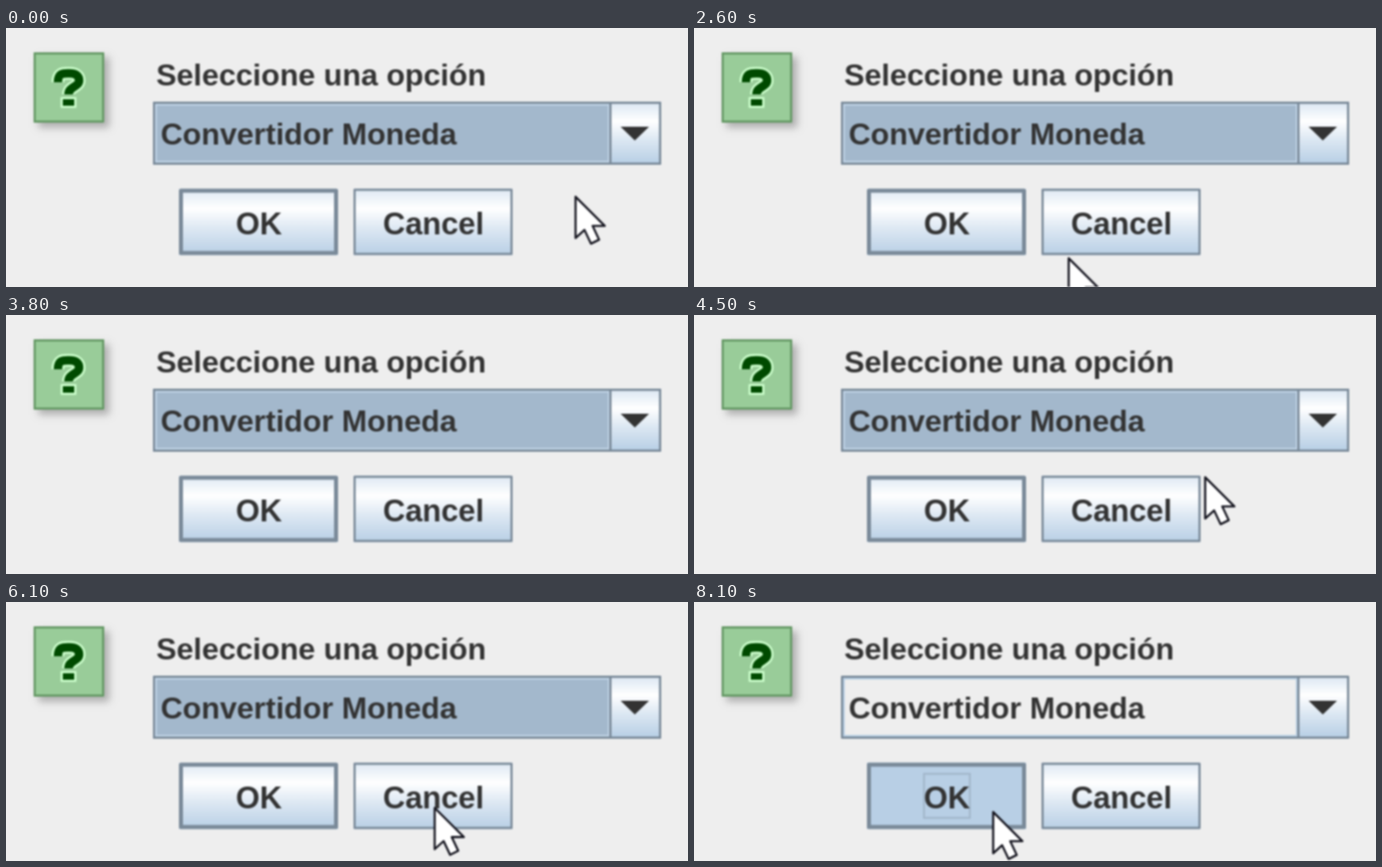
An HTML page with a canvas that plays this animation: 840x320 px, repeating every 8200 ms.

```html
<!DOCTYPE html>
<html lang="es">
<head>
<meta charset="utf-8">
<title>Seleccione una opción</title>
<style>
html, body { margin: 0; width: 840px; height: 320px; overflow: hidden; background: #eee; }
canvas { display: block; filter: blur(.9px); }
</style>
</head>
<body>
<canvas id="stage" width="840" height="320"></canvas>
<script>
const ctx = document.getElementById('stage').getContext('2d');
const LOOP = 8200, STEP = 100;
const EDGE = '#7a8a99', PRESSED = '#b8cfe5', INK = '#333';

// Pointer moves: start time, duration, end x, end y, downward bow
const home = [701, 208];
const moves = [
  [0, 900, 773, 132],
  [1200, 100, 538, 179],
  [1400, 500, 525, 143],
  [1900, 500, 445, 294],
  [2500, 100, 461, 284],
  [2600, 800, 766, 132],
  [3600, 100, 722, 178],
  [3800, 200, 692, 200],
  [4000, 800, 600, 200],
  [4800, 700, 535, 208],
  [5700, 900, 517, 237, 35],
  [6600, 100, 368, 259]
];
const arrow = new Path2D('M0 0V51L11 41L19 58L29 53L21 36H36Z');
const mark = new Path2D('M64 67C64 55 71 56 78 56C86 56 90 59 90 65C90 73 77 72 77 82');
const within = (t, a, b) => t >= a && t < b;

function pointerAt(t) {
  const i = moves.findLastIndex(m => m[0] <= t);
  const [begin, span, x, y, bow = 0] = moves[i];
  const [x0, y0] = i ? moves[i - 1].slice(2) : home;
  const u = Math.min(1, (t - begin) / span), k = u * u * (3 - 2 * u);
  return [x0 + (x - x0) * k, y0 + (y - y0) * k + bow * Math.sin(Math.PI * k)];
}

function rect(x, y, w, h, fill) {
  ctx.fillStyle = fill;
  ctx.fillRect(x, y, w, h);
}

function frame(x, y, w, h, color, line) {
  ctx.strokeStyle = color;
  ctx.lineWidth = line;
  ctx.strokeRect(x + line / 2, y + line / 2, w - line, h - line);
}

function text(str, x, y, size, align = 'left') {
  ctx.font = `bold ${size}px "Liberation Sans", Arial, sans-serif`;
  ctx.textAlign = align;
  ctx.fillStyle = INK;
  ctx.fillText(str, x, y);
}

function bevel(x, y, w, h, pressed) {
  const g = ctx.createLinearGradient(0, y, 0, y + h);
  ['#dde8f3', '#fff', '#dde8f3'].forEach((c, i) => g.addColorStop(i * .3, c));
  g.addColorStop(1, PRESSED);
  rect(x, y, w, h, pressed ? PRESSED : g);
}

function button(label, x, line, pressed) {
  bevel(x, 198.5, 196, 82, pressed);
  frame(x, 198.5, 196, 82, EDGE, line);
  if (pressed) frame(282, 211, 59, 57, '#a3b8cc', 2.5);
  text(label, x + 98.5, 255, 38, 'center');
}

function icon() {
  ctx.save();
  ctx.shadowColor = 'rgba(0,0,0,.27)';
  ctx.shadowBlur = 9;
  ctx.shadowOffsetX = ctx.shadowOffsetY = 6;
  rect(34, 30, 87, 87, '#9c9');
  ctx.restore();
  frame(34, 30, 87, 87, '#696', 2.7);

  ctx.lineJoin = 'round';
  for (const [color, pad] of [['#cfc', 2.7], ['#004a00', 0]]) {
    ctx.strokeStyle = color;
    ctx.lineWidth = 10.5 + pad * 2;
    ctx.stroke(mark);
    rect(70 - pad, 88 - pad, 14 + pad * 2, 8 + pad * 2, color);
  }
}

function combo(focused, pressed) {
  rect(181, 91, 626, 78, focused ? '#a3b8cc' : '#eee');
  frame(183, 93, 561, 74, focused ? '#c3d6e9' : PRESSED, 2.7);
  bevel(745, 93, 60, 74, pressed);
  rect(743, 92, 2.8, 76, EDGE);
  frame(181, 91, 626, 78, EDGE, 2.7);
  ctx.fillStyle = INK;
  ctx.fill(new Path2D('M757 122H792L774.5 139Z'));
  text('Convertidor Moneda', 190.5, 144, 37.5);
}

function pointer(x, y) {
  ctx.save();
  ctx.translate(x + .5, y + .5);
  ctx.fillStyle = '#fff';
  ctx.fill(arrow);
  ctx.strokeStyle = '#15151f';
  ctx.lineWidth = 2.6;
  ctx.lineJoin = 'round';
  ctx.stroke(arrow);
  ctx.restore();
}

function draw(now) {
  const t = Math.floor(now % LOOP / STEP) * STEP;
  const okPressed = t >= 8100;
  const arrowPressed = within(t, 1100, 1200) || within(t, 3500, 3600);
  const hidden = within(t, 1400, 1900) || within(t, 3800, 4000);
  rect(0, 0, 840, 320, '#eee');
  icon();
  text('Seleccione una opción', 185, 71, 37.5);
  combo(!okPressed, arrowPressed);
  button('OK', 213, 5, okPressed);
  button('Cancel', 428, 2.7, false);
  if (!hidden) pointer(...pointerAt(t));
}

const start = performance.now();
function tick() {
  draw(performance.now() - start);
  requestAnimationFrame(tick);
}
tick();
</script>
</body>
</html>
```
